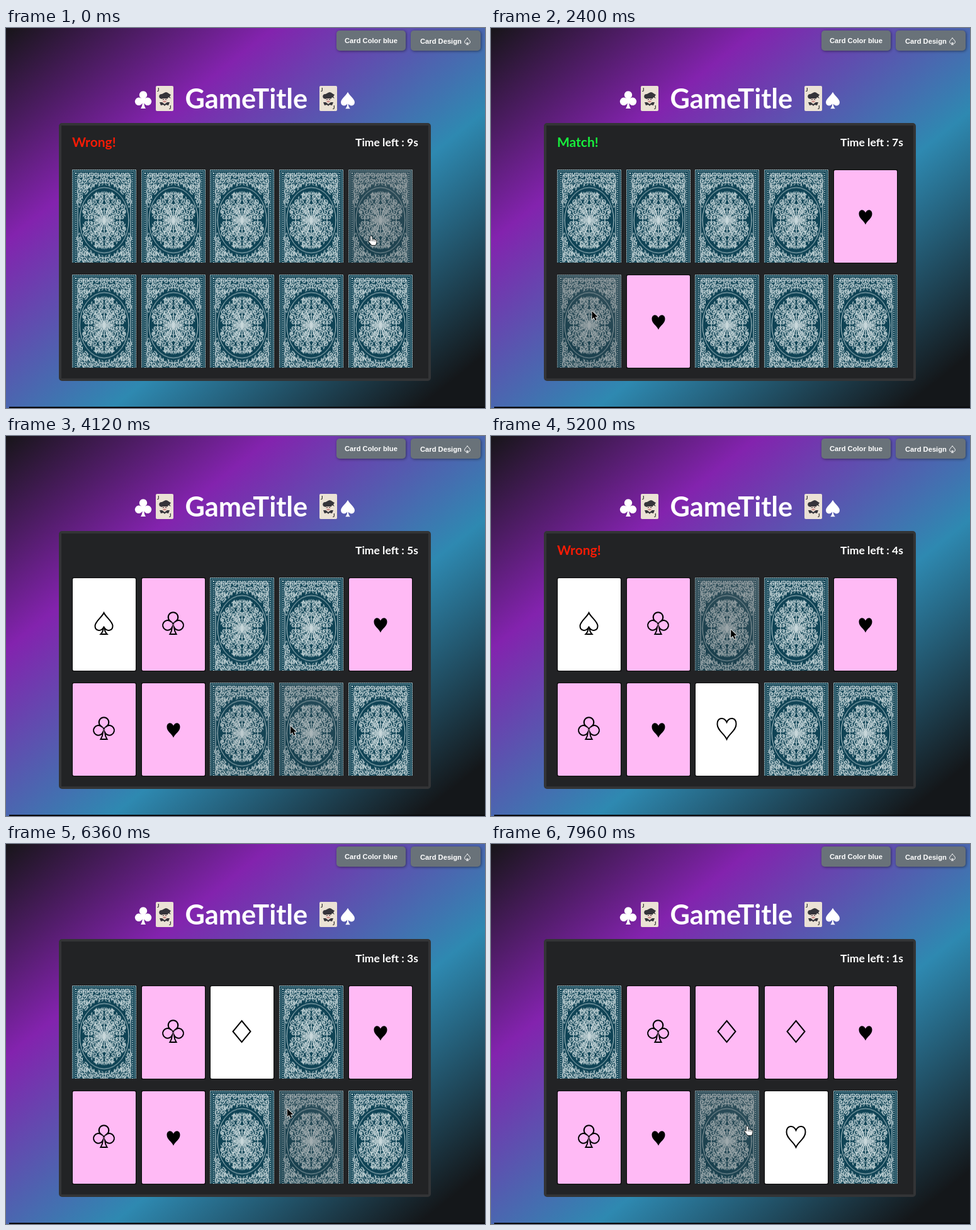
Recreate the animation shown at these times as an HTML page with a canvas. Size 761 by 604 pixels, loop 8 s.

```html
<!DOCTYPE html>
<html lang="en">
<head>
<meta charset="utf-8">
<title>Card memory game</title>
<style>
html, body { margin: 0; width: 100%; height: 100%; overflow: hidden; background: #111; }
canvas { display: block; }
</style>
</head>
<body>
<canvas id="stage" width="761" height="604"></canvas>
<script>
const LOOP = 8000, CARD_W = 102, CARD_H = 148, BACK_H = 161;
const TRAVEL = 640, FADE = 200, SHOW_WRONG = 1040;
const FONT = 'Lato, sans-serif';
const ctx = document.getElementById('stage').getContext('2d');

// S spade, C club, D diamond, h heart, H solid heart
const shapes = {
  S: new Path2D('M0-17C4-9 14-3 14 4C14 12 5 13 1 7C1 12 3 15 5 17H-5C-3 15-1 12-1 7C-5 13-14 12-14 4C-14-3-4-9 0-17Z'),
  C: new Path2D('M-3.5-3A7.8 7.8 0 1 1 3.5-3A7.8 7.8 0 1 1 1.5 6C2 11 3 14 5 17H-5C-3 14-2 11-1.5 6A7.8 7.8 0 1 1-3.5-3Z'),
  h: new Path2D('M0-10C4-19 15-18 15-7C15 3 4 8 0 17C-4 8-15 3-15-7C-15-18-4-19 0-10Z'),
  D: new Path2D('M0-17L14 0L0 17L-14 0Z')
};
shapes.H = shapes.h;
const arrow = new Path2D('M0 0V13L3 10L5.3 15L7.5 14L5.2 9.3H9.5Z');
const hand = new Path2D('M0 1C0-.6 2.4-.6 2.4 1V5C4 4 4.6 4.6 4.8 5.4C6.2 4.7 7 5.3 7.2 6.2C8.6 5.6 9.4 6.3 9.4 7.5V10L8 14H2L-2.6 8.6C-3.2 7-1.4 6.4 0 8Z');

const cards = [...'SCDDHCHhhS'].map((suit, i) => ({
  suit,
  x: Math.round(105 + 109.7 * (i % 5)),
  y: i < 5 ? 225 : 392,
  open: Infinity, match: Infinity, close: Infinity
}));
const isOpen = (c, t) => t >= c.open && t < c.close;
const inside = (c, p) => p.x >= c.x && p.x < c.x + CARD_W && p.y >= c.y && p.y < c.y + CARD_H;

// Pointer stops: time of leaving, place, and whether it clicks there
const stops = [
  [1120, 579, 331, true], [1880, 270, 455, true], [2420, 160, 450, true], [2920, 254, 337, true],
  [3560, 165, 310, true], [4080, 453, 461], [4600, 395, 465, true], [5740, 381, 306, true],
  [6400, 447, 421], [6920, 482, 320, true], [7520, 475, 440, true], [7940, 406, 449]
].map(([t, x, y, click]) => ({ t, x, y, click }));

// Play the clicks through once to get the times of every card and message
const messages = [{ t: 0, text: 'Wrong!' }];
let first = null;
for (const stop of stops.filter(s => s.click)) {
  const { t } = stop, card = cards.find(c => inside(c, stop));
  card.open = t;
  if (!first) {
    first = card;
    messages.push({ t, text: '' });
    continue;
  }
  const same = first.suit === card.suit;
  first[same ? 'match' : 'close'] = card[same ? 'match' : 'close'] = same ? t : t + SHOW_WRONG;
  messages.push({ t, text: same ? 'Match!' : 'Wrong!' });
  first = null;
}

function pointer(t) {
  const found = stops.findIndex(s => s.t > t);
  const i = found < 0 ? stops.length - 1 : found;
  const b = stops[i], a = stops[i - 1] || b;
  const u = a === b ? 1 : Math.min(1, (t - a.t) / Math.min(TRAVEL, b.t - a.t));
  const e = u * u * (3 - 2 * u);
  return { x: a.x + (b.x - a.x) * e, y: a.y + (b.y - a.y) * e, resting: u === 1 || found < 0 };
}

// Share of the last moments spent over the card, which gives a linear fade
function hover(c, t) {
  let n = 0;
  for (let i = 0; i < 12; i++) n += inside(c, pointer(Math.max(0, t - FADE * i / 12)));
  return n / 12;
}

function layer(w, h, draw) {
  const cv = document.createElement('canvas');
  cv.width = w;
  cv.height = h;
  draw(cv.getContext('2d'));
  return cv;
}

function text(g, str, x, y, font, color = '#fff') {
  g.font = font;
  g.fillStyle = color;
  g.fillText(str, x, y);
}

function box(g, x, y, w, h, r, color) {
  g.fillStyle = color;
  g.beginPath();
  g.roundRect(x, y, w, h, r);
  g.fill();
}

function suit(g, name, x, y, scale, color, line) {
  g.save();
  g.translate(x, y);
  g.scale(scale, scale);
  g.fillStyle = g.strokeStyle = color;
  g.lineWidth = line / scale;
  if (line) g.stroke(shapes[name]); else g.fill(shapes[name]);
  g.restore();
}

function curl(g, x, y, r, start, turn) {
  g.beginPath();
  for (let i = 0; i < 22; i++) {
    const a = start + turn * i * .4, d = r * (1 - i / 24);
    g.lineTo(x + d * Math.cos(a), y + d * Math.sin(a));
  }
  g.stroke();
}

// Ornament of seeded scrolls, mirrored into four quarters around an oval
const back = layer(CARD_W, CARD_H, g => {
  const dark = '#0f4355', light = '#c9d8db';
  let seed = 11;
  const rnd = n => (seed = seed * 16807 % 2147483647) / 2147483647 * n;
  const frame = (d, width, dash = []) => {
    g.lineWidth = width;
    g.setLineDash(dash);
    g.strokeRect(d, d, CARD_W - 2 * d, BACK_H - 2 * d);
  };
  g.fillStyle = dark;
  g.fillRect(0, 0, CARD_W, CARD_H);
  g.strokeStyle = light;
  frame(.5, 1, [2, 1]);
  frame(3, 1, [1, 1]);
  frame(6, 2, [1, 2]);
  frame(9, 1);

  const quarter = layer(CARD_W / 2, BACK_H / 2, q => {
    const oval = (x, y) => Math.hypot(x / 38, y / 51);
    q.strokeStyle = light;
    q.lineCap = 'round';
    q.lineWidth = 1.25;
    for (let row = 0; row < 9; row++) for (let col = 0; col < 5; col++) {
      const x = 4 + col * 8.3 + row % 2 * 2, y = 5 + row * 8.2, d = oval(x, y);
      if (x < 40 && (d < .9 || d > 1.14)) curl(q, x, y, 4.7, rnd(6.3), (row + col) % 2 ? 1 : -1);
    }
    q.lineWidth = .9;
    for (let i = 0; i < 330; i++) {
      const x = rnd(40), y = rnd(70), a = Math.atan2(y, x) + rnd(1.4), d = oval(x, y);
      if (d > .9 && d < 1.08) continue;
      q.beginPath();
      q.moveTo(x, y);
      q.lineTo(x + 2.2 * Math.cos(a), y + 2.2 * Math.sin(a));
      q.stroke();
    }
    q.beginPath();
    q.ellipse(0, 0, 39, 52, 0, 0, 7);
    q.stroke();
    q.lineWidth = 1.4;
    for (let i = 0; i < 5; i++) {
      const a = i * Math.PI / 8;
      q.beginPath();
      q.moveTo(0, 0);
      q.lineTo(17 * Math.cos(a), 22 * Math.sin(a));
      q.stroke();
    }
  });
  g.translate(CARD_W / 2, BACK_H / 2);
  for (const sx of [-1, 1]) for (const sy of [-1, 1]) {
    g.save();
    g.scale(sx, sy);
    g.drawImage(quarter, 0, 0);
    g.restore();
  }
});

function joker(g, x) {
  g.save();
  g.translate(x, 92);
  box(g, 0, 0, 28, 40, 2, '#ebe2d5');
  text(g, 'J', 2, 9, 'bold 8px ' + FONT, '#222');
  text(g, 'J', 21, 37, 'bold 8px ' + FONT, '#222');
  g.fillStyle = '#35343a';
  g.fill(new Path2D('M7 20C4 18 5 13 9 13C11 13 12 11 16 10C19 10 21 13 24 14L22 17L24 20L20 18L18 21L14 18L10 21Z'));
  box(g, 10, 18.5, 8, 8.5, 4, '#e3cdc3');
  g.fillStyle = '#35343a';
  g.fill(new Path2D('M9 18L14 16L20 18L18 20H10ZM6 26L10 26L14 29L18 26L22 26L20 31L16 30L14 32L12 30L8 31ZM11 21h2v1h-2zM15 21h2v1h-2z'));
  box(g, 12, 24.5, 4, 1, 0, '#b94a4a');
  g.restore();
}

function button(g, x, w) {
  g.save();
  g.shadowColor = 'rgba(0,0,0,.45)';
  g.shadowBlur = 4;
  g.shadowOffsetX = g.shadowOffsetY = 1;
  box(g, x, 4, w, 32, 5, '#697279');
  g.restore();
}

const scene = layer(761, 604, g => {
  // Equal colours run parallel to the line between the two other corners
  const k = 2 / (1 / 761 ** 2 + 1 / 604 ** 2);
  const bg = g.createLinearGradient(0, 0, k / 761, k / 604);
  bg.addColorStop(0, '#171519');
  bg.addColorStop(.28, '#8323ae');
  bg.addColorStop(.61, '#2e89b1');
  bg.addColorStop(.93, '#14171a');
  g.fillStyle = bg;
  g.fillRect(0, 0, 761, 604);
  box(g, 5, 602, 756, 2, 0, '#08090b');

  button(g, 525, 110);
  button(g, 643, 111);
  const small = 'bold 11.2px "Liberation Sans", Arial, sans-serif';
  text(g, 'Card Color blue', 538, 24, small);
  text(g, 'Card Design', 658, 25, small);
  suit(g, 'S', 733, 21, .32, '#fff', 1);

  text(g, 'GameTitle', 284.5, 127.5, 'bold 43.3px ' + FONT);
  suit(g, 'C', 218, 114.5, .8, '#fff');
  suit(g, 'S', 543, 115, .78, '#fff');
  joker(g, 238);
  joker(g, 498);

  box(g, 84, 151, 591, 410, 5, '#333436');
  box(g, 88, 155, 583, 402, 0, '#222325');
});

function drawCard(c, t) {
  const { x, y } = c;
  if (isOpen(c, t)) {
    box(ctx, x, y, CARD_W, CARD_H + 1, 0, '#0b0b0c');
    box(ctx, x + 1, y + 1, CARD_W - 2, CARD_H - 1, 2, t >= c.match ? '#ffbaf5' : '#fff');
    if (c.suit === 'H') suit(ctx, 'H', x + 51, y + 75.5, .7, '#000');
    else suit(ctx, c.suit, x + 50.5, y + 73, 1, '#000', 2);
    return;
  }
  ctx.drawImage(back, x, y);
  const a = hover(c, t);
  if (!a) return;
  const veil = ctx.createLinearGradient(x, y + CARD_H, x + CARD_W, y);
  veil.addColorStop(0, 'rgba(40,42,45,.25)');
  veil.addColorStop(1, 'rgba(105,104,106,.45)');
  ctx.globalAlpha = a;
  box(ctx, x, y, CARD_W, CARD_H, 0, veil);
  ctx.globalAlpha = 1;
}

function drawPointer(t) {
  const p = pointer(t);
  const pointing = p.resting && cards.some(c => inside(c, p) && !isOpen(c, t));
  const shape = pointing ? hand : arrow;
  ctx.save();
  ctx.translate(p.x, p.y);
  ctx.lineJoin = 'round';
  ctx.lineWidth = 1.4;
  ctx.strokeStyle = pointing ? '#000' : '#fff';
  ctx.fillStyle = pointing ? '#fff' : '#000';
  ctx.stroke(shape);
  ctx.fill(shape);
  if (pointing) {
    ctx.lineWidth = .7;
    ctx.stroke(new Path2D('M2.4 5V8M4.8 5.5V8M7.2 6.3V8.5'));
  }
  ctx.restore();
}

function render(t) {
  ctx.drawImage(scene, 0, 0);
  const message = messages.findLast(m => m.t <= t).text;
  text(ctx, message, 105, 189, 'bold 21px ' + FONT, message === 'Match!' ? '#17f03c' : '#f51b05');
  const left = t < 1000 ? 9 : 8 - Math.floor((t - 930) / 1000);
  text(ctx, `Time left : ${left}s`, 555, 188, 'bold 17.5px ' + FONT);
  for (const c of cards) drawCard(c, t);
  drawPointer(t);
}

const began = performance.now();
function tick() {
  render((performance.now() - began) % LOOP);
  requestAnimationFrame(tick);
}
tick();
</script>
</body>
</html>
```
